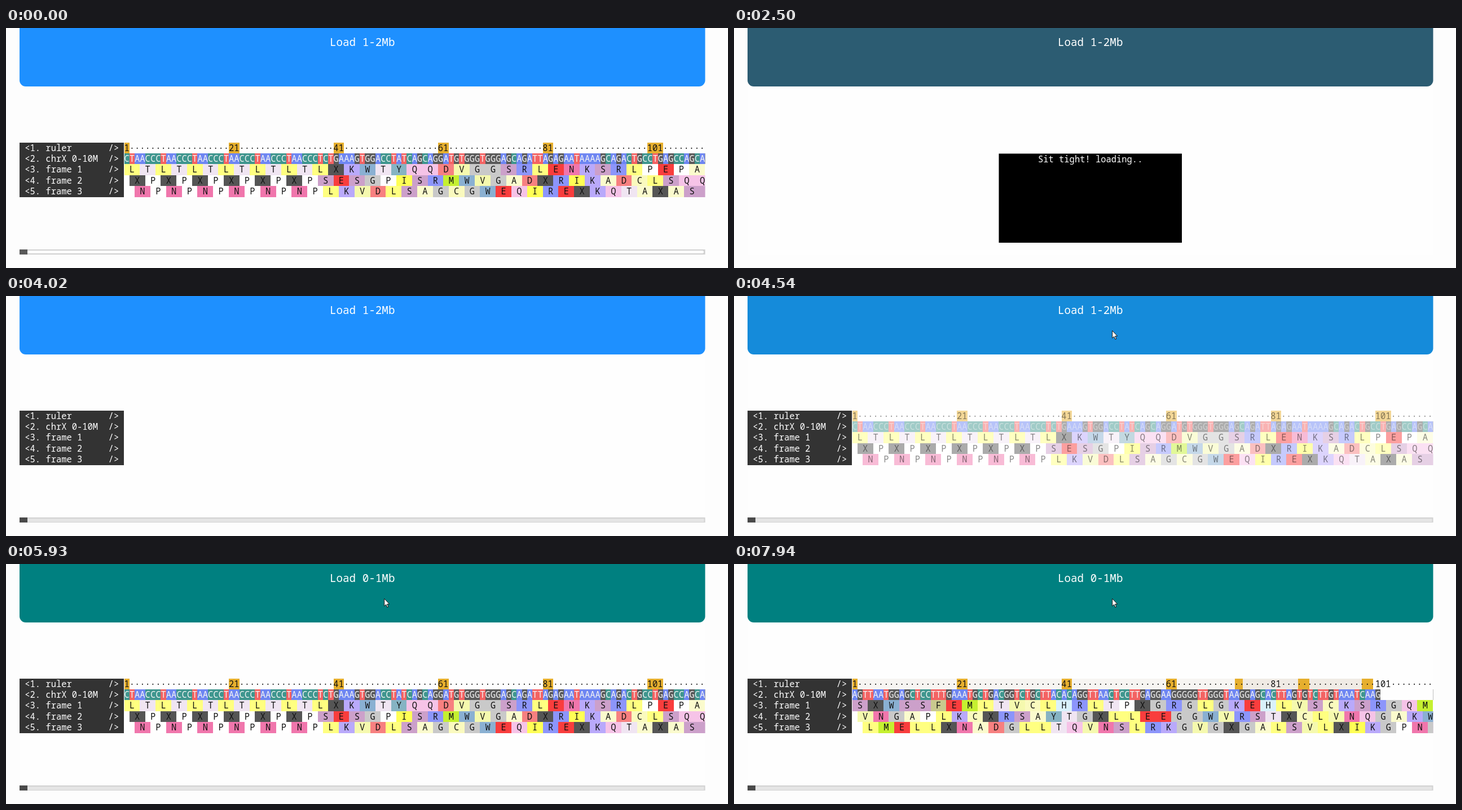
An HTML page with a canvas that plays this animation: 1280x427 px, repeating every 8000 ms.

```html
<!DOCTYPE html>
<html lang="en">
<head>
<meta charset="utf-8">
<title>Sequence viewer</title>
<style>
html, body { margin: 0; height: 100%; overflow: hidden; background: #fdfdfd; }
canvas { display: block; }
</style>
</head>
<body>
<canvas id="stage" width="1280" height="427"></canvas>
<script>
const ctx = document.getElementById('stage').getContext('2d');
const LOOP = 8000, CHAR = 9.277, ROW = 19.4, LEFT = 24, TOP = 203.5, SEQ = 209.5, RIGHT = 1239.5;
const FONT = '"Noto Sans Mono", "DejaVu Sans Mono", monospace';
const BLUE = [30, 144, 255], SLATE = [47, 79, 79], TEAL = [0, 128, 128], GOLD = '#e6af2e';

const FIRST = 'CTAACC'.repeat(6) +
  'CTCTGAAAGTGGACCTATCAGCAGGATGTGGGTGGGAGCAGATTAGAGAATAAAAGCAGACTGCCTGAGCCAGCAGT';
const SECOND = 'AGTTAATGGAGCTCCTTTGAAATGCTGACGGTCTGCTTACACAGGTTAACTCCTTGAGGAAGGGGG' +
  'TTGGGTAAGGAGCACTTAGTGTCTTGTAAATCAAGGGGCCAAATGGG';

// Standard genetic code in TCAG order, X = stop.
const CODE = 'FFLLSSSSYYXXCCXWLLLLPPPPHHQQRRRRIIIMTTTTNNKKSSRRVVVVAAAADDEEGGGG';
const BASE = { A: '#6e86f2', C: '#3f968e', G: '#5a5a5a', T: '#f36363' };
const AMINO = {
  L: '#ffff80', T: '#f0e5f2', X: '#555555', K: '#b9a9fb', W: '#8ab0d2', Y: '#86b3c3', Q: '#f6c3e7',
  D: '#f78080', V: '#f5f9ae', G: '#c9c9c9', S: '#cca0ca', R: '#8c95fb', E: '#f93d3d', N: '#f076ac',
  P: '#ffffff', A: '#fbfbcd', I: '#ffff55', M: '#c5f030', C: '#fafabe', H: '#d9f1fb', F: '#c9c98e'
};
const LABELS = ['ruler', 'chrX 0-10M', 'frame 1', 'frame 2', 'frame 3'];

const clamp = v => Math.min(1, Math.max(0, v));
const ramp = (t, from, to) => clamp((t - from) / (to - from));
const mix = (a, b, p) => `rgb(${a.map((v, i) => Math.round(v + (b[i] - v) * p))})`;
const colX = i => SEQ + i * CHAR;
const translate = codon => CODE[[...codon].reduce((n, b) => n * 4 + 'TCAG'.indexOf(b), 0)];

function rect(x0, y0, x1, y1, color) {
  ctx.fillStyle = color;
  ctx.fillRect(x0, y0, x1 - x0, y1 - y0);
}

function text(str, x, y, color, align = 'left', size = CHAR / 0.6) {
  ctx.font = `${size}px ${FONT}`;
  ctx.textAlign = align;
  ctx.fillStyle = color;
  ctx.fillText(str, x, y);
}

const rowTop = r => Math.round(TOP + r * ROW);
const baseline = r => TOP + r * ROW + 15;

function cell(r, i, span, color) {
  rect(Math.round(colX(i)), rowTop(r), Math.round(colX(i + span)), rowTop(r + 1), color);
}

function button(color, label) {
  ctx.fillStyle = color;
  ctx.beginPath();
  ctx.roundRect(LEFT, -40, RIGHT - LEFT, 144, 11);
  ctx.fill();
  text(label, 631.7, 31.5, '#fff', 'center', 19.25);
}

function labels(alpha) {
  ctx.globalAlpha = alpha;
  rect(LEFT, rowTop(0), 209, rowTop(5), '#333');
  LABELS.forEach((name, r) =>
    text(` <${r + 1}. ${name.padEnd(12)}/> `, LEFT, baseline(r), '#fff'));
  ctx.globalAlpha = 1;
}

function ruler(partial) {
  if (partial) {
    rect(SEQ, rowTop(0), 888, rowTop(1), '#f7f5f2');
    rect(888, rowTop(0), 1133, rowTop(1), '#f0ebe5');
    for (const [a, b] of [[888, 902], [1000, 1020], [1113, 1133]]) rect(a, rowTop(0), b, rowTop(1), GOLD);
  }
  let line = '';
  for (let n = 1; n < 112; n += 20) {
    const mark = String(n);
    if (!partial || n < 80) cell(0, n - 1, mark.length, GOLD);
    line += mark.padEnd(20, '·');
  }
  text(line, SEQ, baseline(0), '#111');
}

function tracks(seq, alpha, partial) {
  ctx.save();
  ctx.globalAlpha = alpha;
  ctx.beginPath();
  ctx.rect(209, 203, RIGHT - 209, 98);
  ctx.clip();
  rect(209, 203, RIGHT, 301, '#fefefe');
  ruler(partial);
  const shown = partial ? 101 : 112;
  [...seq.slice(0, shown)].forEach((b, i) => {
    cell(1, i, 1, BASE[b]);
    text(b, colX(i), baseline(1), '#f4f4f4');
  });
  for (let f = 0; f < 3; f++) {
    for (let i = f; i + 3 <= seq.length; i += 3) {
      const acid = translate(seq.slice(i, i + 3));
      cell(f + 2, i, 3, AMINO[acid]);
      text(acid, colX(i + 1), baseline(f + 2), '#111');
    }
  }
  ctx.restore();
}

function scrollbar(hollow) {
  if (hollow) {
    rect(LEFT, 394, RIGHT, 403, '#d0d0d0');
    ctx.fillStyle = '#fff';
    ctx.beginPath();
    ctx.roundRect(30, 396, 1207, 5, 2.5);
    ctx.fill();
  } else {
    rect(LEFT, 394, RIGHT, 403, '#d2d2d2');
    rect(LEFT, 396, RIGHT - 2, 402, '#e5e5e5');
  }
  rect(LEFT, 394, 38, 403, hollow ? '#595959' : '#4a4a4a');
}

function loading() {
  rect(469.5, 223.5, 794, 382, '#000');
  text('Sit tight! loading..', 631.7, 239, '#fff', 'center');
}

const arrow = new Path2D('M0 0V13.2L3 10.4L5.2 15.4L7.2 14.5L5 9.6H9Z');
function cursor() {
  ctx.save();
  ctx.translate(670.7, 61.7);
  ctx.fillStyle = '#fff';
  ctx.strokeStyle = '#111';
  ctx.lineWidth = 1;
  ctx.fill(arrow);
  ctx.stroke(arrow);
  ctx.restore();
}

function buttonColor(t) {
  if (t < 2160) return mix(BLUE, SLATE, 0);
  if (t < 2810) return mix(BLUE, SLATE, Math.min(0.8, (t - 2100) / 500));
  if (t < 4300) return mix(BLUE, SLATE, 0.8 * (1 - ramp(t, 2770, 2960)));
  return mix(BLUE, TEAL, t < 5020 ? 0.9 * ramp(t, 4400, 4830) : 1);
}

function draw(t) {
  rect(0, 0, 1280, 427, '#fdfdfd');
  if (t >= 460) rect(LEFT, 100, RIGHT, 403, '#fefefe');
  button(buttonColor(t), t < 5400 ? 'Load 1-2Mb' : 'Load 0-1Mb');

  if (t < 460 || t >= 2810) {
    scrollbar(t < 460);
    labels(t < 460 ? 1 : ramp(t, 3500, 4020));
    const shown = t < 460 ? 1 : ramp(t, 4260, 4830);
    if (shown) tracks(FIRST, shown, false);
    if (t >= 7640) tracks(SECOND, ramp(t, 7600, 7940), true);
  }
  if ((t >= 460 && t < 2810) || (t >= 5400 && t < 5930)) loading();
  if (t >= 4400) cursor();
}

function tick() {
  draw(performance.now() % LOOP);
  requestAnimationFrame(tick);
}
tick();
</script>
</body>
</html>
```
